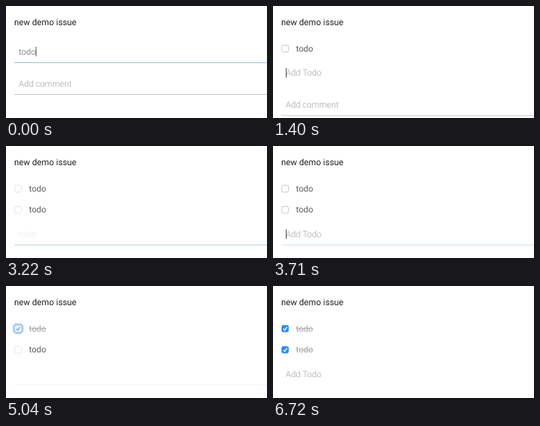
Write an HTML page that moves like this. It is 327 px wide and 140 px high and loops after 6790 ms.

```html
<!DOCTYPE html>
<html lang="en">
<head>
<meta charset="utf-8">
<title>Todo list</title>
<style>
html, body { margin: 0; width: 100%; height: 100%; overflow: hidden; background: #fff; }
svg { display: block; width: 327px; height: 140px; }
text { font: 10.67px Roboto, sans-serif; text-rendering: geometricPrecision; white-space: pre; }
.title { font-size: 10.8px; }
.light { font-weight: 300; }
</style>
</head>
<body>
<svg id="stage" viewBox="0 0 327 140"></svg>
<script>
const LOOP = 6790, STEP = 70, ROW = 26.5;
const stage = document.getElementById('stage');

// Focus line strength: [time, opacity]
const focusLine = [
  [0, .5], [280, 1], [490, 1], [770, 0], [1470, 0], [1750, 1], [2940, 1], [3360, 0],
  [3640, 0], [3990, 1], [4760, 1], [5040, .09], [5600, .09], [5670, .04],
  [6300, .04], [6370, 0], [LOOP, 0]
];

function valueAt(keys, t) {
  const i = keys.findIndex(k => k[0] > t);
  const [t0, a] = keys[i - 1], [t1, b] = keys[i];
  return a + (b - a) * (t - t0) / (t1 - t0);
}

const text = (x, y, label, fill, cls = '') =>
  `<text x="${x}" y="${y}" fill="${fill}" class="${cls}">${label}</text>`;

const bar = (x, y, w, h, fill, opacity = 1) =>
  `<rect x="${x}" y="${y}" width="${w}" height="${h}" fill="${fill}" opacity="${opacity}"/>`;

const square = (y, grow, rx, fill, stroke, width) =>
  `<rect x="${10.9 - grow}" y="${y - grow}" width="${8.6 + 2 * grow}" height="${8.6 + 2 * grow}"
    rx="${rx}" fill="${fill}" stroke="${stroke}" stroke-width="${width}"/>`;

const tick = (y, color) =>
  `<path d="M13 ${y + 4.4}l1.7 1.8 3-4" fill="none" stroke="${color}" stroke-width="1.2"/>`;

function item(i, checked, disabled, ring) {
  const y = 49 + ROW * i;
  let out = ring ? square(y, 1.1, 3.4, 'none', '#a3cdf7', 2.4) : '';
  if (!checked) out += `<g opacity="${disabled ? .45 : 1}">${square(y, 0, 2.4, '#fff', '#c4c4c4', .9)}</g>`;
  else if (disabled) out += square(y, 0, 2.2, '#f1f6fc', '#b4cfec', .8) + tick(y, '#7aa3cf');
  else out += square(y, 0, 2, '#2b8cf0', '#2b8cf0', .4) + tick(y, '#fff');
  out += text(28.8, y + 7.8, 'todo', checked ? '#a2a2a2' : '#5c5c5c');
  return out + (checked ? bar(28.8, y + 4.1, 21.2, .7, '#a2a2a2') : '');
}

function draw(t) {
  const within = (a, b) => t >= a && t < b;
  const count = t < 420 ? 0 : t < 3010 ? 1 : 2;
  const saving = within(420, 1400) || within(3010, 3570);
  const toggling = within(4690, 5390) || within(6090, 6720);
  const typed = t < 420 || within(2730, 3010);
  const shift = ROW * count;
  let out = text(10.2, 23.8, 'new demo issue', '#202020', 'title');

  for (let i = 0; i < count; i++) {
    const checked = t >= (i ? 6090 : 4690);
    const ring = i ? within(6090, 6720) : within(4690, 5460);
    out += item(i, checked, saving || toggling, ring);
  }

  const base = 60.8 + shift;
  if (typed) out += text(16, base, 'todo', '#606060', 'light');
  else if (saving) out += `<g opacity=".13">${text(16, base, 'todo', '#606060', 'light')}</g>`;
  else if (!toggling) out += text(16, base, 'Add Todo', '#a0a0a0', 'light');

  const caret = typed || within(1400, 1960) || within(2590, 2730) || within(3570, 4200);
  if (caret) out += bar(typed ? 37.4 : 16.2, 51 + shift, .8, 12, '#333');

  out += bar(10.5, 70 + shift, 317, 1.33, '#5c9fc0', valueAt(focusLine, t));

  if (count < 2) {
    out += text(16, 100.5 + shift, 'Add comment', '#a0a0a0', 'light');
    out += bar(10.5, 110 + shift, 317, 1, '#c8c8c8');
  }
  stage.innerHTML = out;
}

const start = performance.now();
let last = -1;
function frame() {
  const t = Math.floor((performance.now() - start) % LOOP / STEP) * STEP;
  if (t !== last) draw(last = t);
  requestAnimationFrame(frame);
}
frame();
</script>
</body>
</html>
```
